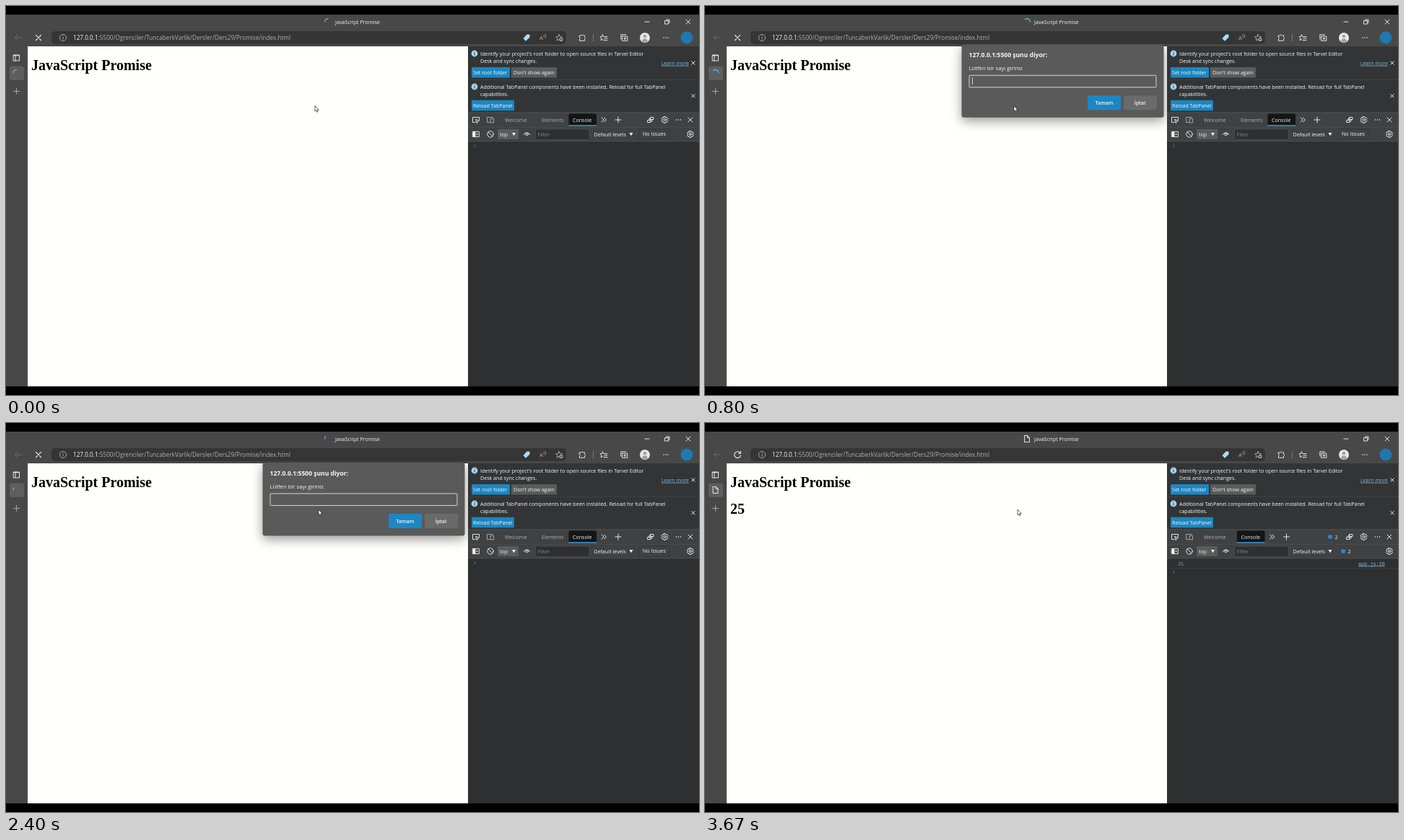
Animation of 960x540 px, one loop 3.99 s. Source, as an HTML page with a canvas:

```html
<!DOCTYPE html>
<html lang="tr">
<head>
<meta charset="utf-8">
<title>JavaScript Promise</title>
<style>
html, body { margin: 0; width: 100%; height: 100%; overflow: hidden; background: #000; }
canvas { display: block; width: 960px; height: 540px; }
</style>
</head>
<body>
<canvas id="stage" width="960" height="540"></canvas>
<script>
const ctx = document.getElementById('stage').getContext('2d');
const LOOP = 3990;
const UI = '"Open Sans", "Noto Sans", sans-serif';
const SERIF = '"Liberation Serif", serif';
const MONO = '"Liberation Mono", monospace';
const C = {
  chrome: '#484848', field: '#353535', page: '#fffffb', panel: '#333435', strip: '#404142',
  console: '#2e2f30', line: '#525354', text: '#f6f6f6', soft: '#b0b0b0', dim: '#858585',
  accent: '#1c86c0', button: '#5b5b5b', dialog: '#5a5a5a', spin: '#6fbbe6', link: '#7fb8de'
};

const clamp = v => Math.max(0, Math.min(1, v));
const mix = (a, b, p) => a + (b - a) * p;
const progress = (t, start, length) => clamp((t - start) / length);
const rad = deg => deg * Math.PI / 180;

function rect(x, y, w, h, color, r = 0) {
  ctx.fillStyle = color;
  ctx.beginPath();
  ctx.roundRect(x, y, w, h, r);
  ctx.fill();
}

function frame(x, y, w, h, color, r = 0, width = 1) {
  ctx.strokeStyle = color;
  ctx.lineWidth = width;
  ctx.beginPath();
  ctx.roundRect(x, y, w, h, r);
  ctx.stroke();
}

function disc(x, y, r, color) {
  ctx.fillStyle = color;
  ctx.beginPath();
  ctx.arc(x, y, r, 0, 7);
  ctx.fill();
}

function text(str, x, y, size = 7.1, color = C.text, weight = 400, family = UI) {
  ctx.font = `${weight} ${size}px ${family}`;
  ctx.fillStyle = color;
  ctx.fillText(str, x, y);
  return ctx.measureText(str).width;
}

function underlined(str, x, y, size, color, family) {
  const w = text(str, x, y, size, color, 400, family);
  rect(x, y + 1, w, 0.7, color);
}

// Strokes (or fills) a path whose origin is the icon centre.
function icon(path, x, y, color = C.text, { fill = false, width = 0.9, scale = 1 } = {}) {
  ctx.save();
  ctx.translate(x, y);
  ctx.scale(scale, scale);
  ctx.lineWidth = width / scale;
  ctx.lineCap = ctx.lineJoin = 'round';
  ctx.strokeStyle = ctx.fillStyle = color;
  const shape = new Path2D(path);
  fill ? ctx.fill(shape) : ctx.stroke(shape);
  ctx.restore();
}

const ring = r => `M${r} 0A${r} ${r} 0 1 1 ${-r} 0A${r} ${r} 0 1 1 ${r} 0Z`;
const star = 'M0-4.5L1.3-1.5 4.5-1.2 2.1.9 2.8 4 0 2.4-2.8 4-2.1.9-4.5-1.2-1.3-1.5Z';
const P = {
  cross: 'M-3-3L3 3M3-3L-3 3',
  plus: 'M-4 0H4M0-4V4',
  minus: 'M-3 0H3',
  restore: 'M-3-1.5H1.5V3H-3ZM-1.5-3H3V1.5',
  back: 'M4.5 0H-4.5M-.8-3.7L-4.5 0-.8 3.7',
  reload: 'M3.9-2A4.4 4.4 0 1 0 4.4.7M4.2-4.6V-1.8H1.4',
  doc: 'M-3-4.5H.8L3.5-1.8V4.5H-3.5V-4.5ZM.6-4.5V-1.6H3.5',
  panes: 'M-4-4H4V4H-4ZM-4-3.2H4M-1.5-4V4',
  tag: 'M-4.5 1L.5-4.5H4.5V-.5L-1 4.8Z',
  puzzle: 'M-3.5-3H-1A1.4 1.4 0 0 1 1.6-3H3.6V-.8A1.4 1.4 0 0 1 3.6 1.8V4.2H-3.5V1.8A1.4 1.4 0 0 0-3.5-.8Z',
  favorites: 'M-1.5-4L-.4-1.5 2.4-1.3M-1.5-4L-2.7-1.5-5-1.1-3.2.7-3.8 3.6-1.4 2.3M.8 1H5M0 3.6H5M2.5-1.4H5',
  stack: 'M-2-2H4.8V4.3H-2ZM-4.2 2V-4.2H2.6M1.4-.5V2.8M-.2 1.2H3',
  chevrons: 'M-2.8-3L0 0-2.8 3M.5-3L3.3 0 .5 3',
  prompt: 'M-1-1.8L1 0-1 1.8',
  inspect: 'M-1 3.5H-4.5V-3.5H4.5V0M0-.5L4.5 1.5 2.3 2.3 1.5 4.5Z',
  device: 'M-4.5 2.5V-3.5H3.5M-4.5 3.5H-1M.5-1.5H4.5V4H.5Z',
  linked: 'M0-3.5H4V-.5H0ZM-4 .5H0V3.5H-4ZM-2 .5V-1.8H0M2-.5V2H0',
  gear: ring(1.5) + 'M-1-4.4H1L1.5-2.9 3-3.4 4.3-1.6 3.2 0 4.3 1.6 3 3.4 1.5 2.9 1 4.4H-1L-1.5 2.9-3 3.4-4.3 1.6-3.2 0-4.3-1.6-3-3.4-1.5-2.9Z',
  ban: ring(4.2) + 'M-3-3L3 3',
  eye: 'M-4.5.5Q0-5 4.5.5' + ring(1.7),
  down: 'M-2.5-2H2.5L0 2.2Z',
  cursor: 'M0 0V7.2L1.7 5.7 2.9 8.3 4 7.8 2.9 5.3H5Z'
};

function dots(x, y) {
  for (const d of [-3, 0, 3]) disc(x + d, y, 0.75, C.text);
}

function info(x, y) {
  disc(x, y, 4.4, '#a6d6f0');
  rect(x - 0.5, y - 0.8, 1, 3.2, C.panel);
  rect(x - 0.5, y - 2.5, 1, 1, C.panel);
}

// Spinner poses: time, tail angle, head angle.
const poses = [[0, 180, 275], [470, 215, 320], [800, 225, 365], [1070, 278, 305],
  [1930, 530, 544], [2930, 540, 635], [3400, 575, 680]];

function spinner(x, y, t) {
  const i = Math.max(1, poses.findIndex(p => p[0] >= t));
  const [a, b] = [poses[i - 1], poses[i]];
  const p = progress(t, a[0], b[0] - a[0]);
  ctx.strokeStyle = C.spin;
  ctx.lineWidth = 1.2;
  ctx.beginPath();
  ctx.arc(x, y, 4.4, rad(mix(a[1], b[1], p)), rad(mix(a[2], b[2], p)));
  ctx.stroke();
}

function browser(t) {
  const loading = t < 3130;
  rect(0, 12, 960, 516, C.chrome);
  if (loading) spinner(446, 22, t); else icon(P.doc, 446, 22);
  text('JavaScript Promise', 456, 24.7, 7.2);
  icon(P.minus, 888, 22);
  icon(P.restore, 916, 22);
  icon(P.cross, 945, 22);

  icon(P.back, 17, 44, '#707070');
  icon(loading ? P.cross : P.reload, 45, 44, C.text, { scale: loading ? 1.2 : 1, width: 1.1 });
  rect(63, 35, 713, 18, C.field, 5);
  icon(ring(4.6) + 'M0-.7V2.3M0-2.3V-2.2', 79, 44, C.soft);
  const host = text('127.0.0.1', 93, 47, 8.2);
  text(':5500/Ogrenciler/TuncaberkVarlik/Dersler/Ders29/Promise/index.html', 93 + host, 47, 8.2, C.soft);
  icon(P.tag, 721, 44, '#a9dcf4', { fill: true });
  text('A', 739, 47, 8, C.soft);
  icon('M0-2Q1.4 0 0 1.5M2-3Q4 0 2 2.4', 745, 42, C.soft, { width: 0.7 });
  icon(star, 766, 44, C.soft);
  disc(769, 46.5, 2.6, C.soft);
  icon(P.plus, 769, 46.5, C.field, { scale: 0.4, width: 0.7 });
  icon(P.puzzle, 798, 44);
  rect(813, 39, 0.8, 10, C.dim);
  icon(P.favorites, 828, 44);
  icon(P.stack, 856, 44);
  disc(885, 44, 7, '#e8e8e6');
  disc(885, 42, 2.3, '#a3a09a');
  icon('M-4 5Q-3.5 1.2 0 1.2T4 5Q0 8 -4 5Z', 885, 44, '#a3a09a', { fill: true });
  dots(914, 44);
  disc(943, 44, 8.5, '#1f78b0');

  icon(P.panes, 14.5, 72);
  rect(5, 83.5, 20, 19.5, '#5e5e5e', 3);
  if (loading) spinner(14.5, 93, t); else icon(P.doc, 14.5, 93);
  icon(P.plus, 14.5, 118.5, C.soft);
}

function page(t) {
  rect(30, 56, 610, 472, C.page);
  text('JavaScript Promise', 35, 89, 20, '#000', 700, SERIF);
  if (t >= 3330) text('25', 35, 126, 20, '#000', 700, SERIF);
}

function infobars() {
  rect(640, 56, 320, 92, C.panel);
  info(649, 66);
  text("Identify your project's root folder to open source files in Tarvel Editor", 657, 68.6);
  text('Desk and sync changes.', 657, 78.6);
  underlined('Learn more', 908, 81.8, 7, C.link);
  icon(P.cross, 952, 79, C.text, { scale: 0.75 });
  rect(645, 85, 53, 14.5, C.accent, 1);
  text('Set root folder', 647, 95);
  rect(700, 85, 63, 14.5, C.button, 1);
  text("Don't show again", 703, 95);
  rect(640, 102, 320, 0.8, '#444546');
  info(649, 112);
  text('Additional TabPanel components have been installed. Reload for full TabPanel', 657, 114.5);
  text('capabilities.', 657, 124.5);
  icon(P.cross, 952, 124.7, C.text, { scale: 0.75 });
  rect(645, 130.8, 59, 14.5, C.accent, 1);
  text('Reload TabPanel', 647, 140.8);
}

function badge(x, y) {
  disc(x - 3, y, 3, '#2f83cc');
  text('2', x + 3.5, y + 2.6);
}

function inspector(t) {
  const done = t >= 3330;
  const shift = done ? -42.5 : 0;
  infobars();
  rect(640, 147.5, 320, 40.5, C.strip);
  rect(640, 147.5, 320, 0.8, C.line);
  icon(P.inspect, 651, 158);
  icon(P.device, 671, 158, C.soft);
  text('Welcome', 691, 160.7, 7.1, C.soft);
  if (!done) text('Elements', 742, 160.7, 7.1, C.soft);
  rect(779.5 + shift, 149.5, 38.5, 17, '#141516', 2);
  rect(779.5 + shift, 165.3, 38.5, 1.4, '#3b9fd8');
  text('Console', 785 + shift, 160.7);
  icon(P.chevrons, 828 + shift, 158);
  icon(P.plus, 848 + shift, 158);
  if (done) badge(869, 158);
  icon(P.linked, 893, 158);
  icon(P.gear, 912.5, 158);
  dots(931.5, 158);
  icon(P.cross, 948, 158);

  rect(640, 168, 320, 0.6, C.line);
  icon('M-4.3-3.6H4.3V3.6H-4.3Z', 651, 178);
  rect(647, 174.8, 3.4, 6.4, C.text);
  icon('M-1.4-1.5L.6 0-1.4 1.5Z', 653.3, 178, C.text, { fill: true });
  icon(P.ban, 671, 178);
  rect(681, 171, 29, 14, C.button, 1);
  text('top', 684, 180.5);
  icon(P.down, 703.5, 178, C.text, { fill: true });
  icon(P.eye, 721.5, 178);
  rect(733.5, 171, 74.5, 14.5, C.console);
  frame(733.5, 171, 74.5, 14.5, C.line, 1, 0.7);
  text('Filter', 736.5, 180.5, 7.1, C.dim);
  text('Default levels', 814.5, 180.5);
  icon(P.down, 866, 178, C.text, { fill: true });
  if (done) {
    badge(887, 178);
  } else {
    frame(877, 171, 42, 14, C.panel, 1, 0.8);
    text('No Issues', 882, 180);
  }
  icon(P.gear, 948, 178);

  rect(640, 188, 320, 340, C.console);
  rect(640, 187.5, 320, 0.7, C.line);
  if (done) {
    text('25', 655, 197.5, 6.85, '#9385d0', 400, MONO);
    underlined('app.js:20', 905, 197.5, 6.85, C.link, MONO);
    rect(640, 201.5, 320, 0.7, '#444546');
  }
  icon(P.prompt, 649.5, done ? 206.5 : 194, '#3588d4');
}

function dialog(t) {
  const closing = progress(t, 2920, 170);
  if (t < 650 || closing === 1) return;
  const focused = t < 2870;
  const typed = t >= 2470;
  ctx.save();
  ctx.beginPath();
  ctx.rect(30, 53, 610, 475);
  ctx.clip();
  ctx.globalAlpha = progress(t, 600, 150) * (1 - closing ** 2);
  ctx.translate(0, -20 * (1 - progress(t, 620, 320)) ** 3 - 8 * closing ** 2);

  ctx.shadowColor = 'rgba(0, 0, 0, .4)';
  ctx.shadowBlur = 16;
  ctx.shadowOffsetY = 5;
  rect(355.5, 55, 280, 101.5, C.dialog, 3);
  ctx.shadowColor = 'transparent';

  text('127.0.0.1:5500 şunu diyor:', 365.5, 73, 8.55, C.text, 700);
  text('Lütfen bir sayı giriniz', 365.5, 90.7, 7.73);
  frame(366, 98, 259, 16.5, focused ? '#d4d4d4' : '#707070', 1);
  if (typed) text('5', 370, 108.5, 7.5);
  const caret = (t - (typed ? 2470 : 670)) % 1000 < 500;
  if (focused && caret) rect(typed ? 375 : 370, 101, 0.8, 10, C.text);

  ctx.textAlign = 'center';
  rect(530, 126, 46, 20, '#1d86c4', 2);
  text('Tamam', 553, 138.5, 7, C.text, 600);
  rect(580, 126, 46, 20, '#6a6a6a', 2);
  text('İptal', 602.5, 138.5, 7, C.text, 600);
  ctx.restore();
}

function pointer(t) {
  const p = progress(t, 1670, 200);
  const ease = p * p * (3 - 2 * p);
  const x = mix(428, 433, ease);
  const y = mix(139, 120.5, ease);
  icon(P.cursor, x, y, '#fff', { fill: true });
  icon(P.cursor, x, y, '#222', { width: 0.7 });
}

function recordedTime(ms) {
  let n = Math.floor((ms + 3.4) * 15 / 1000);
  if (n === 24 || n === 25) n = 23;
  return Math.round(n * 100 / 15) * 10;
}

const start = performance.now();

function draw() {
  const t = recordedTime((performance.now() - start) % LOOP);
  ctx.fillStyle = '#000';
  ctx.fillRect(0, 0, 960, 540);
  browser(t);
  page(t);
  inspector(t);
  dialog(t);
  pointer(t);
  requestAnimationFrame(draw);
}
draw();
</script>
</body>
</html>
```
